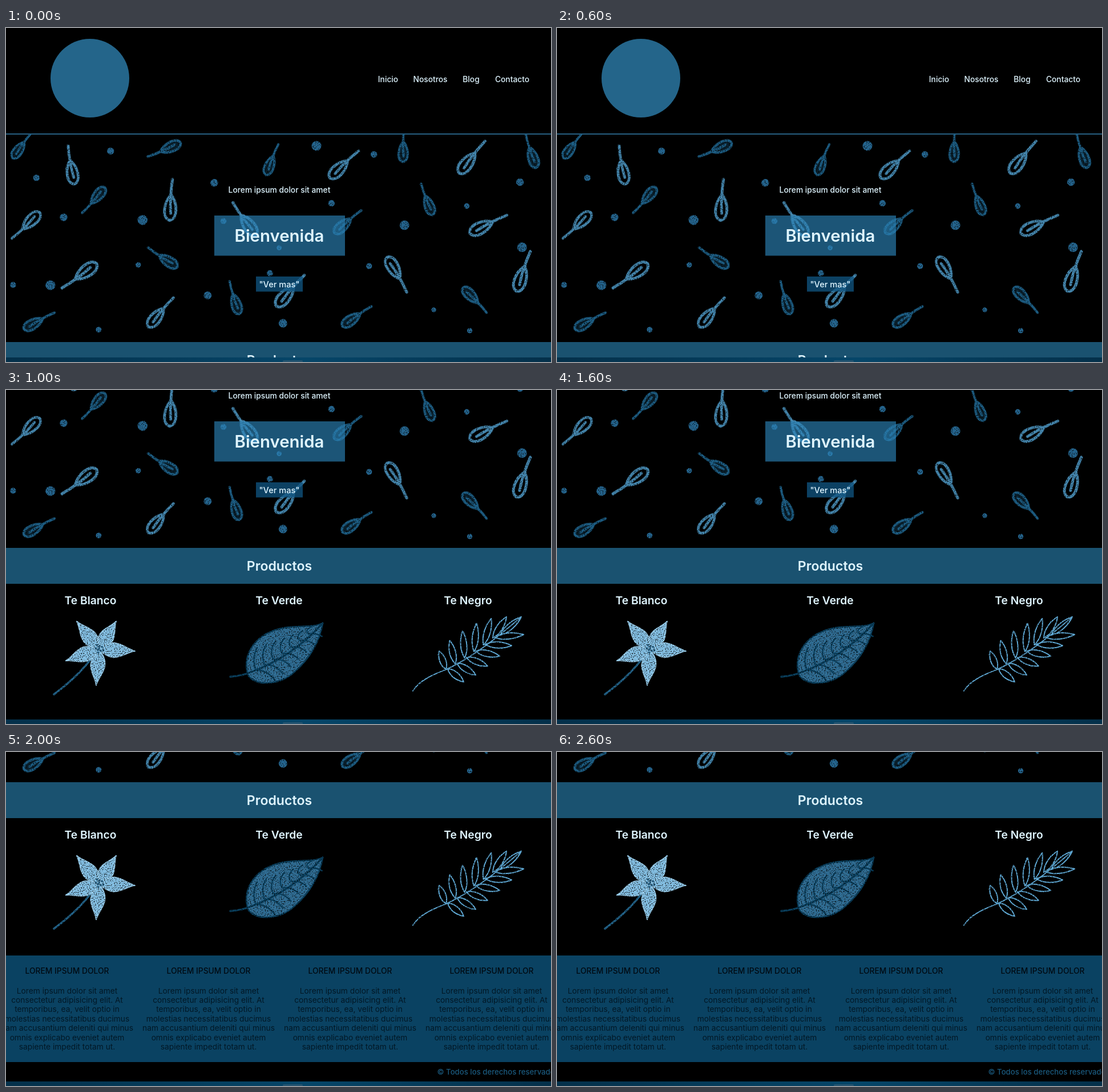
An HTML page that plays this animation: 955 px wide and 586 px high, repeating every 3000 ms.

```html
<!DOCTYPE html>
<html lang="es">
<head>
<meta charset="utf-8">
<title>Tienda de te</title>
<style>
  html, body { margin: 0; width: 100%; height: 100%; overflow: hidden; background: #000; }
  svg { display: block; width: 955px; height: 586px; }
  text { font: 500 13.8px Inter, "Noto Sans", sans-serif; fill: #dff5ff; text-anchor: middle; }
  .title { font-size: 29.4px; font-weight: 600; }
  .band { font-size: 23.1px; font-weight: 600; }
  .name { font-size: 19.3px; font-weight: 600; }
  .button { font-size: 14.6px; }
  .head { fill: #000a12; }
  .copy { font-weight: 400; font-size: 13.75px; fill: #021826; }
  .legal { font-size: 13.2px; text-anchor: start; fill: #1a597d; }
  .line { fill: none; stroke-linecap: round; stroke-linejoin: round; }
  #page { animation: scroll 3s step-end infinite; }
  @keyframes scroll {
    0% { transform: translateY(0); }
    33.333% { transform: translateY(-274px); }
    66.666%, 100% { transform: translateY(-498px); }
  }
</style>
</head>
<body>
<svg viewBox="0 0 955 586">
  <defs>
    <filter id="chalk" filterUnits="userSpaceOnUse" x="0" y="180" width="955" height="640" color-interpolation-filters="sRGB">
      <feTurbulence type="fractalNoise" baseFrequency=".5" numOctaves="2" seed="4" result="noise"/>
      <feDisplacementMap in="SourceGraphic" in2="noise" scale="2" xChannelSelector="R" yChannelSelector="G" result="rough"/>
      <feColorMatrix in="noise" values="0 0 0 0 0  0 0 0 0 0  0 0 0 0 0  3 0 0 0 -.55" result="grain"/>
      <feComposite in="rough" in2="grain" operator="in"/>
    </filter>
    <clipPath id="heroBox"><rect y="186" width="955" height="365"/></clipPath>
    <linearGradient id="barFill">
      <stop offset="0" stop-color="#04304a"/>
      <stop offset=".55" stop-color="#064669"/>
      <stop offset="1" stop-color="#04304a"/>
    </linearGradient>
  </defs>

  <rect width="955" height="586"/>
  <g id="page">
    <circle cx="147" cy="88" r="69" fill="#24658a"/>
    <text x="669.5" y="95">Inicio</text>
    <text x="743.5" y="95">Nosotros</text>
    <text x="815" y="95">Blog</text>
    <text x="887" y="95">Contacto</text>
    <rect y="185" width="955" height="2" fill="#275f82"/>

    <g clip-path="url(#heroBox)"><g id="pattern" filter="url(#chalk)"></g></g>
    <text x="479" y="289">Lorem ipsum dolor sit amet</text>
    <rect x="365" y="329" width="229" height="70.5" fill="#2b83b7" fill-opacity=".65"/>
    <text class="title" x="479" y="374.5">Bienvenida</text>
    <rect x="438" y="436" width="82" height="26.5" fill="#105581" fill-opacity=".77"/>
    <text class="button" x="479" y="454.5">"Ver mas"</text>

    <rect y="551" width="955" height="63" fill="#1a5270"/>
    <text class="band" x="479" y="591">Productos</text>
    <text class="name" x="148" y="650">Te Blanco</text>
    <text class="name" x="478.5" y="650">Te Verde</text>
    <text class="name" x="809.5" y="650">Te Negro</text>

    <g filter="url(#chalk)">
      <g id="flower">
        <path class="line" d="M150 744Q127 776 84 808" stroke="#23658c" stroke-width="3.5"/>
      </g>
      <g id="leaf" class="line" stroke="#0a4160" stroke-width="2.4">
        <path fill="#316f96" d="M424 774C413 736 438 700 488 691C515 687 538 691 555 683C550 715 532 746 505 769C481 792 437 795 424 774Z"/>
        <path stroke-width="3.4" d="M393 777Q415 775 426 770Q500 744 555 683"/>
      </g>
      <g id="fern" class="line" stroke="#62aedb" stroke-width="2">
        <path d="M713 802C725 782 752 772 772 764C822 741 865 704 903 672"/>
      </g>
    </g>

    <rect y="855" width="955" height="187" fill="#0a4262"/>
    <g id="columns"></g>
    <text class="legal" x="755.5" y="1064">© Todos los derechos reservados</text>
  </g>

  <rect y="578" width="955" height="8" fill="url(#barFill)"/>
  <rect x="485" y="583" width="35" height="5" rx="2" fill="#255470"/>
</svg>
<script>
  const $ = id => document.getElementById(id);

  function add(parent, tag, attrs, text) {
    const el = document.createElementNS("http://www.w3.org/2000/svg", tag);
    for (const k in attrs) el.setAttribute(k, attrs[k]);
    if (text) el.textContent = text;
    parent.appendChild(el);
  }

  let seed = 7;
  const random = () => (seed = seed * 16807 % 2147483647) / 2147483647;

  // Blade from a to b: w is the half width, lead the start of the bulge, taper its end.
  function blade([ax, ay], [bx, by], w, lead, taper) {
    const dx = bx - ax, dy = by - ay, len = Math.hypot(dx, dy);
    const h = w * 2.2 / (1 + .65 * taper);
    const at = (t, s) => `${ax + dx * t - dy / len * s} ${ay + dy * t + dx / len * s}`;
    return `M${ax} ${ay}C${at(lead, h)} ${at(.7, h * taper)} ${bx} ${by}`
      + `C${at(.7, -h * taper)} ${at(lead, -h)} ${ax} ${ay}Z`;
  }

  // Scattered sprigs: middle of the blade and direction of the stem.
  const dark = [
    [22, 214, -54], [288, 209, 156], [462, 241, -69], [696, 217, -89], [923, 227, -108],
    [161, 294, 131], [741, 311, -111], [590, 347, -41], [284, 409, -147], [403, 484, -107],
    [48, 519, -29], [814, 469, 46], [605, 512, -35]
  ];
  const light = [
    [116, 253, -100], [583, 248, -44], [808, 237, -52], [288, 315, -87], [44, 338, 136], [833, 350, -27],
    [425, 346, -126], [140, 427, 144], [489, 471, -49], [263, 508, -50], [679, 421, 60], [902, 440, -72]
  ];

  function sprigs(list, color, fill, size) {
    for (const [x, y, angle] of list) {
      const s = size * (.94 + random() * .12);
      add($("pattern"), "path", {
        class: "line", stroke: color, "stroke-width": 4.4, style: `fill:${fill}`,
        transform: `translate(${x} ${y}) rotate(${angle}) scale(${s})`,
        d: blade([-20, 0], [20, 0], 9, .08, .8) + "M-9 1Q15 -2 44 1"
      });
    }
  }
  sprigs(dark, "#1d5f86", "#1d5f8650", .93);
  sprigs(light, "#4588b0", "none", 1.1);

  // One dot per grid cell, kept clear of the sprigs where possible.
  for (let i = 0; i < 24; i++) {
    let cx, cy, tries = 0;
    const near = ([x, y]) => Math.hypot(x - cx, y - cy) < 42;
    do {
      cx = (i % 6 + random()) * 159;
      cy = 190 + ((i / 6 | 0) + random()) * 87;
    } while (tries++ < 30 && [...dark, ...light].some(near));
    add($("pattern"), "circle", { cx, cy, r: 4 + random() * 5, fill: "#256690" });
  }

  const flower = $("flower");
  for (const tip of [[124, 680], [193, 680], [226, 732], [158, 792], [105, 749]])
    add(flower, "path", {
      d: blade([163, 729], tip, 13, .45, .12), fill: "#86c2e6",
      stroke: "#9bd0ef", "stroke-width": 2, "stroke-linejoin": "round"
    });
  for (let i = 0; i < 9; i++) {
    const a = i * 2.4, r = 2.8 * Math.sqrt(i);
    add(flower, "circle", { cx: 163 + r * Math.cos(a), cy: 728 + r * Math.sin(a), r: 2, fill: "#2a6488" });
  }

  // Veins leave the midrib in pairs.
  for (let t = 0; t <= 1; t += 1 / 6) {
    const x = 438 + 92 * t, y = 766 - 56 * t - 8 * t * t;
    const up = 40 - 27 * t, down = 24 - 7 * t;
    add($("leaf"), "path", {
      d: `M${x} ${y}q-8 ${-up * .5} ${2 + 4 * t} ${-up}M${x} ${y}q${down * .8} -2 ${down * 1.4} ${down * (.75 - t * .5)}`
    });
  }

  // Leaflets climb both sides of the stem up to the end one.
  const leaflet = (base, tip) => add($("fern"), "path", { d: blade(base, tip, 5.5, .3, .8) });
  for (let i = 0; i < 6; i++) {
    const t = i / 5, x = 771 + 82 * t, y = 764 - 46 * t - 9 * t * t;
    leaflet([x, y], [759 + 118 * t ** 1.15, 732 - 60 * Math.sin(t * Math.PI / 2)]);
    leaflet([x + 3, y - 1], [802 + 105 * t, 786 - 83 * t ** 1.2]);
  }
  leaflet([866, 704], [903, 672]);

  const lines = [
    "Lorem ipsum dolor sit amet", "consectetur adipisicing elit. At", "temporibus, ea, velit optio in",
    "molestias necessitatibus ducimus", "nam accusantium deleniti qui minus",
    "omnis explicabo eveniet autem", "sapiente impedit totam ut."
  ];
  for (let x = 107; x < 955; x += 248) {
    add($("columns"), "text", { class: "head", x, y: 887 }, "LOREM IPSUM DOLOR");
    lines.forEach((s, i) => add($("columns"), "text", { class: "copy", x, y: 921.5 + i * 16.45 }, s));
  }
</script>
</body>
</html>
```
